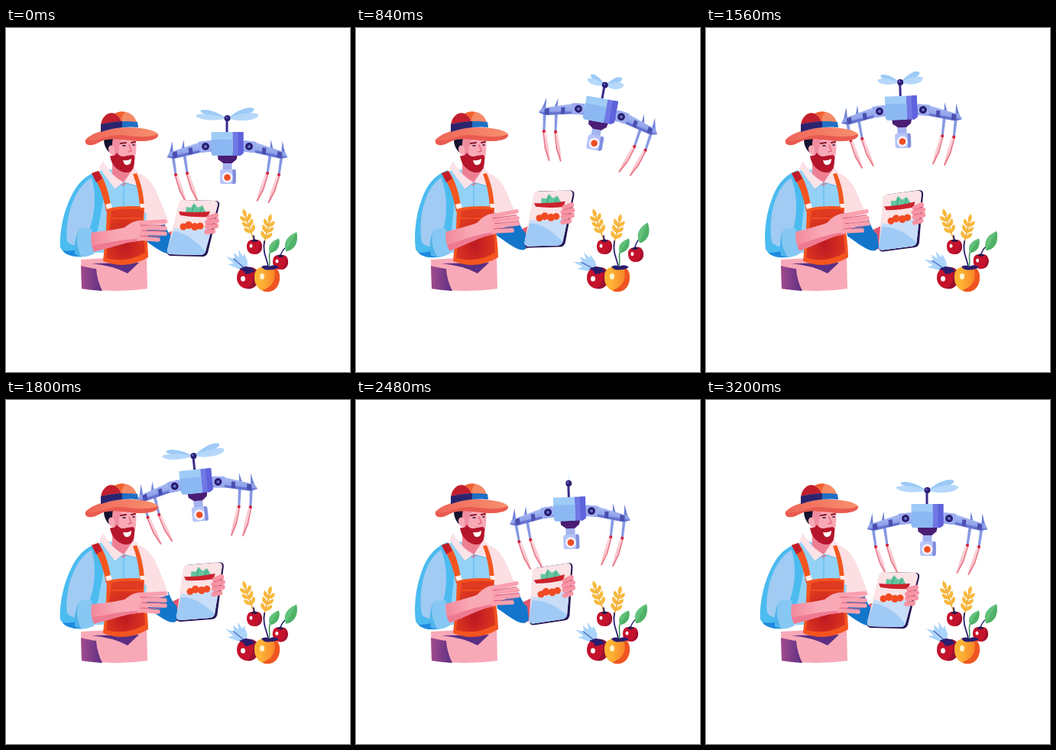
An HTML page that plays this animation: 450 by 450 pixels, repeating every 3.24 s.

```html
<!DOCTYPE html>
<html lang="en">
<head>
<meta charset="utf-8">
<title>Farmer and drone</title>
<style>
html, body { margin: 0; width: 100%; height: 100%; overflow: hidden; background: #fff; }
svg { display: block; width: 100vw; height: 100vh; }
.line { fill: none; stroke-linecap: round; stroke-linejoin: round; }
</style>
</head>
<body>
<svg viewBox="0 0 450 450">
<defs>
  <linearGradient id="armBlue" x2=".3" y2="1"><stop stop-color="#b9cdf8"/><stop offset="1" stop-color="#7f8fe4"/></linearGradient>
  <linearGradient id="legPink" x2="0" y2="1"><stop stop-color="#fbd9de"/><stop offset="1" stop-color="#f8b6c0"/></linearGradient>
  <linearGradient id="skin"><stop stop-color="#f08398"/><stop offset=".5" stop-color="#f9a9b6"/><stop offset="1" stop-color="#f9a9b6"/></linearGradient>
  <linearGradient id="brim"><stop stop-color="#ee6558"/><stop offset="1" stop-color="#f8906f"/></linearGradient>
  <radialGradient id="bib" cx=".48" cy=".7" r=".6"><stop stop-color="#bd1822"/><stop offset="1" stop-color="#e03a20"/></radialGradient>
  <linearGradient id="plum"><stop stop-color="#a24b8e"/><stop offset="1" stop-color="#5b2f83"/></linearGradient>
  <linearGradient id="mango"><stop offset=".25" stop-color="#fdb435"/><stop offset=".75" stop-color="#f98b2b"/><stop offset="1" stop-color="#f2551f"/></linearGradient>

  <g id="side">
    <g id="leg">
      <path d="M-73 13h4l3 24h-3z" fill="#8799e3"/>
      <path d="M-70 37l5-1 7 20 5 17q0 2-2 1l-8-15z" fill="url(#legPink)"/>
      <path class="line" d="M-68 38l6 20 8 15" stroke="#e05a6c" stroke-width="1"/>
      <circle cx="-67.500" cy="37" r="2" fill="#d3213c"/>
      <path d="M-77 14l5-21 2 22z" fill="#7182d8"/>
    </g>
    <use href="#leg" x="15" y="-2"/>
    <path d="M-20-7h-12L-76 8l-3 6 9 2 34-8 16-2z" fill="url(#armBlue)"/>
    <path d="M-79 14l9 2 34-8 16-2v-2l-17 1z" fill="#6673cf"/>
    <path d="M-72 8l6-2 1 8-6 1zM-51 2l5-1 1 8-5 2z" fill="#4b4fb0"/>
    <path d="M-38-6l16-2v15l-14 1z" fill="#98aaf0"/>
    <circle cx="-28.500" r="6" fill="#a9b6f5"/><circle cx="-28.500" r="5" fill="#2a1d6e"/>
    <circle cx="-28.500" r="2" fill="#6275cf"/>
  </g>
  <g id="wing">
    <path d="M1 0C10-8 25-16 34-13 40-9 20-1 1 0z" fill="#9dcaf7"/>
    <path d="M1 0C14-6 34-9 41-5 41 3 16 6 1 0z" fill="#b5d8fa"/>
  </g>
  <g id="ear">
    <path class="line" d="M0 0V-38" stroke="#e6a02f" stroke-width="1.500"/>
    <g id="grains"><path d="M0-9c-8-3-8-7-7-10 5 2 7 5 7 10 0-5 2-8 7-10 1 3 1 7-7 10z" fill="#f8b83c"/></g>
    <use href="#grains" y="-8"/><use href="#grains" y="-16"/>
    <path d="M0-31q-5-5 0-12 5 7 0 12z" fill="#f8b83c"/>
  </g>
  <g id="cherry">
    <path d="M-10 0C-10-9-4-10 0-8 5-11 10-7 10 0 10 7 5 10 0 10S-10 7-10 0z" fill="#c5122c"/>
    <path d="M10 0C10 7 5 10 0 10 6 6 8 0 7-8 9-5 10-3 10 0z" fill="#a51030"/>
    <path d="M-5-8q6 4 10 0l-5-2z" fill="#2a174e"/>
    <ellipse cx="-4.500" cy="-1" rx="2" ry="2.600" fill="#fff"/>
  </g>
  <g id="leaf">
    <path d="M0 0C-4-12 2-20 14-25 17-11 11-1 0 0z" fill="#62c17b"/>
    <path d="M0 0L14-25C17-11 11-1 0 0z" fill="#4fb268"/>
  </g>
</defs>

<g id="drone">
  <use href="#side"/><use href="#side" transform="scale(-1 1)"/>
  <path d="M-2-35h3v16h-3z" fill="#3a2b8c"/>
  <g id="prop"><use href="#wing"/><use href="#wing" transform="scale(-1 .8)"/></g>
  <circle cy="-37" r="4" fill="#2c2076"/><circle cx="-1" cy="-38" r="1.300" fill="#6b62c4"/>
  <path d="M-6 18H6v15H-6z" fill="#a5b2ef"/>
  <path d="M-13 8h27l-2 9-6 5H-5l-7-5z" fill="#4a1d73"/>
  <path d="M-21-19h28v31h-26l-2-3z" fill="#9fcbf7"/>
  <path d="M7-19h14V9l-4 3H7z" fill="#7078e4"/>
  <path d="M-21-9H7v21h-26l-2-3z" fill="#8bb8f2"/>
  <path d="M14-19h7V9l-4 3h-3z" fill="#5f62dc"/>
  <rect x="-9.500" y="30" width="21" height="19" rx="3" fill="#b6c4f7"/>
  <path d="M7 30h2q2 0 2 3v13q0 3-3 3H7z" fill="#7f8bdc"/>
  <circle cy="40.500" r="7" fill="#f4f1fb"/><circle cy="40.500" r="4.300" fill="#ef4d23"/>
</g>

<g id="fruit">
  <use href="#ear" transform="translate(324 277) rotate(-19)"/>
  <use href="#ear" transform="translate(337 285) rotate(13)"/>
  <path class="line" d="M343 316C344 304 335 298 338 279M325 279l-1-7" stroke="#2a1d6e" stroke-width="1.800"/>
  <use href="#leaf" transform="translate(345 294) scale(.85 .75)"/>
  <path class="line" d="M343 315c4-8 0-13 2-21" stroke="#329451" stroke-width="1.500"/>
  <g id="sprig">
    <path class="line" d="M359 298q2-7 7-11" stroke="#2a1d6e" stroke-width="1.500"/>
    <use href="#leaf" x="366" y="292"/>
    <use href="#cherry" x="359" y="306"/>
  </g>
  <use href="#cherry" x="325" y="286"/>
  <g id="frond">
    <path d="M315 317l-11-2-14-6 8-1-10-9 11 3-1-8 7 6-1-10 6 9 2-4 4 11z" fill="#aad4fa"/>
    <path class="line" d="M315 317L298 302" stroke="#4a5fc0" stroke-width="1.200"/>
  </g>
  <path d="M302 327c0-11 9-16 16-14 9 0 15 7 13 16-2 9-9 13-16 12-8-1-13-7-13-14z" fill="#c4122c"/>
  <path d="M322 313c8 3 10 9 9 16-2 9-9 13-16 12 9-7 10-18 7-28z" fill="#9a1030"/>
  <path d="M305 315l8-3 8 1 5 5-7 3-6 1-2-4z" fill="#2a1d6e"/>
  <ellipse cx="310" cy="328" rx="3" ry="3.500" fill="#fff"/>
  <path d="M325 327c-1-11 7-16 15-14 10-4 18 2 18 13 0 12-7 19-16 19-10 0-17-8-17-18z" fill="url(#mango)"/>
  <path d="M350 313c6 2 8 7 8 13 0 12-7 19-16 19-3 0-5-1-7-2 15-4 20-17 15-30z" fill="#ef5522"/>
  <path d="M334 312q6-3 10 0 8-4 13 1-6 4-11 3-8 2-12-4z" fill="#2a1d6e"/>
  <ellipse cx="335" cy="325" rx="3" ry="4" fill="#fff3cf"/>
</g>

<g id="torso">
  <path d="M98 303l86-5 1 43q-41 6-86 0z" fill="#f8a9b7"/>
  <path d="M98 311q12 3 20 4 1 15 8 29-14-1-27-3z" fill="url(#plum)"/>
  <path d="M112 308l62-1-15 14q-18-10-47-13z" fill="#5b2f83"/>
  <g id="farArm">
    <path d="M204 272l20-10 3 28-14 5z" fill="#e0586f"/>
    <path d="M176 260l31-5q4 13 11 19l2 17-5 4c-10 1-21-9-36-19z" fill="#1376cb"/>
  </g>
  <path d="M168 188c15 4 23 13 29 27 6 13 11 26 16 40l-30 9-12-40z" fill="#fbdfe3"/>
  <path d="M125 184l46 5c9 12 12 30 13 50l-3 55h-65L104 215z" fill="#93d2f6"/>
  <path d="M169 189l12 6 4 47-7-1c-2-20-5-38-9-52z" fill="#fbdfe3"/>
</g>

<g class="nearArm">
  <path d="M121 187C102 193 92 205 84 223 73 246 70 272 71 287c4 9 16 13 31 12l18-35 10-52z" fill="#4bbbf0"/>
  <path d="M112 196c-14 8-23 23-29 44-3 13-5 28-3 39 8 9 18 5 24-1l7-20c6-20 7-43 1-62z" fill="#a1cbf3"/>
  <path d="M74 291c4 6 14 9 28 8l-2-12q-12 6-26 4z" fill="#1e8be0"/>
</g>

<g id="apron">
  <path d="M139 173l29 10-6 18-9 6-14-13z" fill="#ee7f93"/>
  <path d="M127 174l-5 9 21 28 11-9c-11-6-20-15-27-28z" fill="#fbe3e8"/>
  <path d="M167 183l6 5-1 19-18-5z" fill="#fbe3e8"/>
  <path d="M143 211l11-9 18 5M154 204v31" class="line" stroke="#5ab5ea" stroke-width="1"/>
  <path d="M112 190l9-3c10 14 14 31 17 50l-7 3c-3-19-10-37-19-50z" fill="#f4551f"/>
  <path d="M112 190l9-3 5 10-8 5z" fill="#c31d2b"/>
  <path d="M166 191l5-1c6 14 9 27 10 45h-6c-1-17-4-31-9-44z" fill="#f2571f"/>
  <path d="M132 236q25-5 49-2l-1 24q5 10 6 42-28 17-59 5l4-42z" fill="#f4541f"/>
  <path d="M138 239q22-4 42-1l-2 22q3 10 4 34-25 14-51 7l4-39z" fill="url(#bib)"/>
  <path class="line" d="M138 249h40" stroke="#f4541f" stroke-width="1.500"/>
  <path d="M130 231l7-2 2 6-7 2zM175 230h6l1 5h-6z" fill="#fff0ec"/>
</g>

<g id="head">
  <path d="M128 142h18l-4 23c-9 0-15-11-14-23z" fill="#15132f"/>
  <path d="M141 140h28c2 10 2 23-1 33-5 12-17 14-25 6-5-6-6-20-2-39z" fill="#f9a9b6"/>
  <path d="M141 140h15c-8 8-9 19-9 28l-8-4q-1-11 2-24z" fill="#f18ca0"/>
  <path d="M134 158c0-6 7-6 8 0v9c-4 0-8-4-8-9z" fill="#f9a9b6"/>
  <path d="M136 167c4 1 7 0 9-4 5 7 9 5 14 4l7-1c2 1 3 3 2 7 0 9-2 15-9 16-9 1-21-7-23-22z" fill="#b5162c"/>
  <path d="M153 173q6 1 11-2c0 5-2 8-5 8-3 1-5-2-6-6z" fill="#fff"/>
  <path class="line" d="M150 151l7-1M164 150l5-1" stroke="#84182c" stroke-width="2"/>
  <path class="line" d="M153 154h3M166 153h2" stroke="#2a1236" stroke-width="1.500"/>
  <path class="line" d="M161 153l3 8-4 1" stroke="#e4667f" stroke-width="1.500"/>
  <path d="M104 146C112 138 124 134 142 131c24-3 53 1 57 8 1 6-10 9-24 9-19-1-37-5-48-1-7 3-12 7-19 6-4-1-5-4-4-7z" fill="url(#brim)"/>
  <path d="M105 147c15 3 26-8 46-7 19 2 34 4 48-1 1 6-10 9-24 9-19-1-37-5-48-1-7 3-12 7-19 6-3-1-4-3-3-6z" fill="#e95a50"/>
  <path d="M124 130c0-13 9-21 18-18 10-6 22-1 26 5 3 5 4 9 5 13-17-4-33-3-49 0z" fill="#f58a66"/>
  <path d="M124 130c0-13 9-21 18-18 6 3 9 8 10 16z" fill="#c11f2e"/>
  <path d="M142 112c6-3 10-3 14-2-4 4-5 8-4 14-1-6-5-10-10-12z" fill="#f2602f"/>
  <path d="M124 126q25-6 48-3l1 7q-25-2-49 6z" fill="#1f6fc4"/>
  <path d="M124 126q14-3 28-4v8q-14 1-28 6z" fill="#2c236d"/>
</g>

<g id="tablet">
  <path d="M234 225l41 1q5 1 4 6l-15 62q-2 5-7 5l-42-1q-5-1-4-6l16-63q2-4 7-4z" fill="#261653"/>
  <path id="screen" d="M232 225l41 1q5 1 4 6l-16 60q-2 5-7 5l-39-1q-5-1-4-6l15-61q1-4 6-4z" fill="#fbe3e6"/>
  <path d="M220 261c17 7 32-2 49 2l-8 29q-2 5-7 5l-39-1q-5-1-4-6z" fill="#c7ddf8"/>
  <path d="M219 266c17 2 29 12 42 27q-2 4-7 4l-39-1q-5-1-4-6z" fill="#9fcaf5"/>
  <path d="M235 242l1-8 6 1 4-6 5 6 6-3 5 10z" fill="#63c59e"/>
  <path class="line" d="M243 241l3-9M253 241l4-6" stroke="#389b7c" stroke-width="1"/>
  <path d="M226 240q20 2 41 0l-3 7q-19 1-36-2z" fill="#cb222d"/>
  <g fill="#f04b23">
    <circle cx="232" cy="260" r="4.500"/><circle cx="239" cy="258" r="5"/>
    <circle cx="247" cy="260" r="5"/><circle cx="254" cy="259" r="4.500"/>
  </g>
  <g class="line" stroke-width="6">
    <path d="M275 245l-10 3M276 252l-13 2M275 259l-12 1M271 266l-9 1" stroke="#f794a4"/>
    <path d="M277 248l-13 3M277 256l-14 1M274 263l-11 1" stroke="#dc5f78" stroke-width=".8"/>
  </g>
</g>

<g class="nearArm">
  <g id="forearm">
    <path d="M106 268c16-2 32-3 49-7 10-8 17-10 26-9l5 20-11 7c-18 0-35 8-65 15z" fill="url(#skin)"/>
    <path d="M108 285c24-3 40-9 67-9v3c-18 0-35 8-65 15z" fill="#ee7a92"/>
    <g class="line" stroke-width="5.500">
      <path d="M176 255l32-2M178 261l30 1M177 268l31 1M174 275l25 2" stroke="#f9a0af"/>
      <path d="M176 258l32 0M178 265l30 1M176 272l26 1" stroke="#d8587a" stroke-width="1"/>
    </g>
  </g>
  <path d="M96 263q8-3 17 0-5 17 3 32-9 5-18 4-9-18-2-36z" fill="#86c8f3"/>
  <path d="M96 263q-7 18 2 36-5-1-8-3-2-18 6-33z" fill="#50b3eb"/>
</g>
</svg>
<script>
const LOOP = 3240;
const times = [0, 360, 840, 1180, 1560, 2040, 2480, 2840, LOOP];
const keys = {
  x: [289.5, 314, 319, 306, 255.5, 246.5, 279.5, 290, 289.5],
  y: [155, 126, 111, 105, 108, 113, 146, 155, 155],
  tilt: [0, 6, 10.5, 7, -2, -7.5, -2, 0, 0],
  spin: [0, 1.73, 4.295, 5.9, 7.756, 10.244, 12.5, 14.2, 16],
  arm: [0, 0, -1, 1.1, -1, 1, -1, -.3, 0],
  tabX: [0, 0, 8, 9, 10, 8, 10, 4, 0],
  tabY: [0, 0, -12, -11, -9.5, -12, -8, -3, 0],
  tabTilt: [0, 0, -3, -5, -9, -3, -10, -4, 0],
  sprig: [0, .7, 1, .6, .1, -.1, 0, 0, 0],
  frond: [0, -7, -14, -12, -8, 2, -3, 0, 0]
};
const el = id => document.getElementById(id);
const put = (node, transform) => node.setAttribute("transform", transform);
const nearArm = document.querySelectorAll(".nearArm");

// Monotone cubic curve, at rest at both ends and at each turning point.
function curve(v, t) {
  const slope = i => (v[i + 1] - v[i]) / (times[i + 1] - times[i]);
  const tangent = i => {
    if (i === 0 || i === v.length - 1) return 0;
    const a = slope(i - 1), b = slope(i);
    return a * b <= 0 ? 0 : 2 * a * b / (a + b);
  };
  let i = 0;
  while (i < times.length - 2 && t >= times[i + 1]) i++;
  const h = times[i + 1] - times[i], s = (t - times[i]) / h, r = 1 - s;
  return v[i] * (1 + 2 * s) * r * r + v[i + 1] * s * s * (3 - 2 * s)
    + h * s * r * (tangent(i) * r - tangent(i + 1) * s);
}

function draw(now) {
  const t = now % LOOP, k = {};
  for (const name in keys) k[name] = curve(keys[name], t);
  put(el("drone"), `translate(${k.x} ${k.y}) rotate(${k.tilt})`);
  put(el("prop"), `translate(0 -37) scale(${Math.abs(Math.cos(Math.PI * k.spin))} 1)`);
  nearArm.forEach(g => put(g, `rotate(${k.arm * 5} 110 205)`));
  put(el("forearm"), `rotate(${k.arm * 2.5} 102 284)`);
  put(el("tablet"), `translate(${k.tabX} ${k.tabY}) rotate(${k.tabTilt} 244 261)`);
  put(el("farArm"), `translate(${k.tabX * .6} ${k.tabY * .4})`);
  put(el("sprig"), `translate(${k.sprig * 7} ${k.sprig * -10}) rotate(${k.sprig * -8} 359 306)`);
  put(el("frond"), `rotate(${k.frond} 315 317)`);
}

function tick() {
  draw(performance.now());
  requestAnimationFrame(tick);
}
tick();
</script>
</body>
</html>
```
